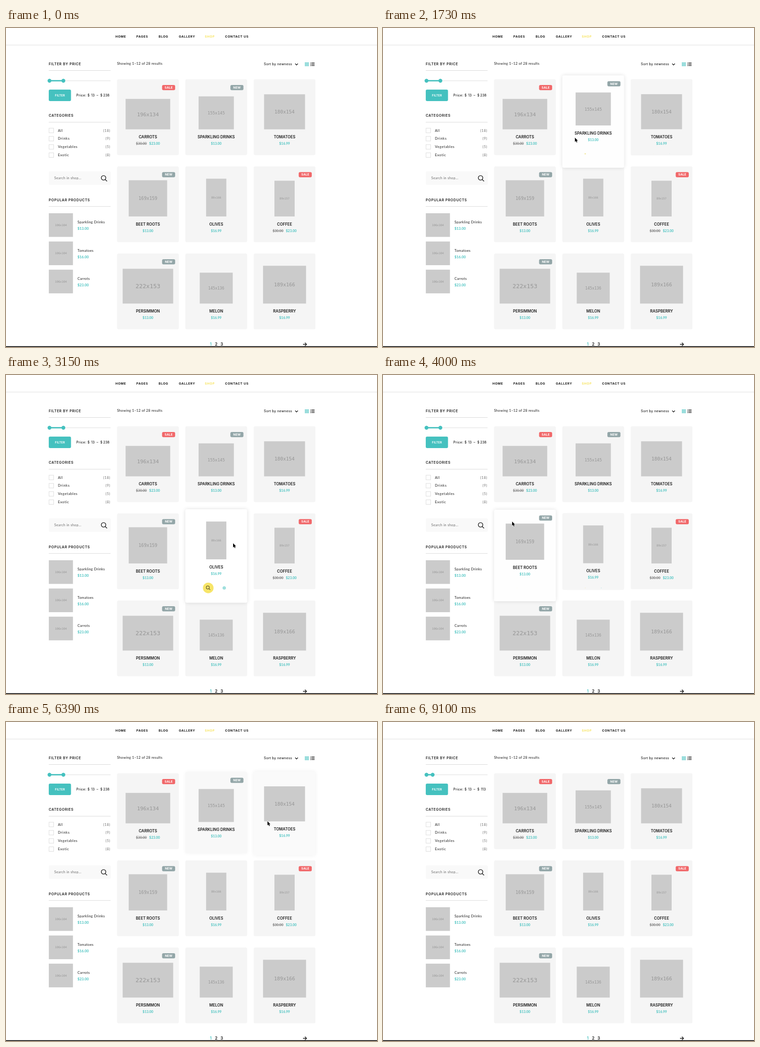
Animation of 807 by 694 pixels, one loop 9.82 s. Source, as an HTML page with a canvas:

```html
<!DOCTYPE html>
<html lang="en">
<head>
<meta charset="utf-8">
<title>Shop page</title>
<style>
html, body { margin: 0; width: 100%; height: 100%; overflow: hidden; background: #fff; }
canvas { display: block; width: 807px; height: 694px; }
</style>
</head>
<body>
<canvas id="stage"></canvas>
<script>
const W = 807, H = 694, LOOP = 9820, STEP = 95.4;
const TEAL = '#45c1bf', INK = '#1b1b1b', YELLOW = '#f7e463';
const SANS = 'Inter, "Open Sans", sans-serif';
const LATO = 'Lato, "Open Sans", sans-serif';
const MONO = '"DejaVu Sans Mono", "Liberation Mono", monospace';

const canvas = document.getElementById('stage');
const ctx = canvas.getContext('2d');
const dpr = window.devicePixelRatio || 1;
canvas.width = W * dpr;
canvas.height = H * dpr;

const CARD_W = 134.4, CARD_H = 165;
const cards = [
  ['CARROTS', '196x134', '$23.00', 'SALE', '$30.00'],
  ['SPARKLING DRINKS', '155x145', '$13.00', 'NEW'],
  ['TOMATOES', '180x154', '$16.99'],
  ['BEET ROOTS', '169x159', '$13.00', 'NEW'],
  ['OLIVES', '89x166', '$16.99'],
  ['COFFEE', '89x157', '$23.00', 'SALE', '$30.00'],
  ['PERSIMMON', '222x153', '$13.00', 'NEW'],
  ['MELON', '145x136', '$16.99'],
  ['RASPBERRY', '189x166', '$16.99']
].map(([name, size, price, badge, old], i) => ({
  name, size, price, badge, old, hovers: [],
  x: 241.5 + (i % 3) * 148.6,
  y: 111.5 + Math.floor(i / 3) * 189.5
}));

// Pointer tip: time, x, y
const pointer = [
  [100, 747, 306], [300, 640, 335], [500, 538, 265], [560, 519, 225], [585, 525, 216],
  [800, 540, 213], [1054, 621, 222], [1150, 617, 225], [1500, 538, 234], [1800, 375, 240],
  [2030, 306, 277], [2199, 302, 352], [2640, 376, 365], [2790, 390, 367], [3150, 494, 366],
  [3520, 494, 366], [3990, 241, 310], [4360, 99, 238], [4700, 99, 238], [5040, 99, 261],
  [5430, 99, 261], [5620, 98, 243], [6200, 524, 205], [6480, 648, 235], [7040, 127, 116],
  [7400, 135, 113], [7541, 172, 113], [7860, 173, 113], [8220, 107, 113], [8400, 120, 117],
  [8686, 804, 147]
];
const handle = [[7350, 124.8], [7541, 149.2], [7730, 173], [7860, 173], [8215, 108]];

const clamp = v => Math.max(0, Math.min(1, v));
const ease = v => 1 - Math.pow(1 - clamp(v), 2.5);

function sample(keys, t) {
  let i = 0;
  while (i < keys.length - 1 && keys[i + 1][0] <= t) i++;
  const a = keys[i], b = keys[Math.min(i + 1, keys.length - 1)];
  const k = b === a ? 0 : clamp((t - a[0]) / (b[0] - a[0]));
  return a.slice(1).map((v, j) => v + (b[j + 1] - v) * k);
}

function findHovers() {
  for (let t = 100; t < 9060; t += 5) {
    const [x, y] = sample(pointer, t);
    for (const c of cards) {
      if (x < c.x || x > c.x + CARD_W || y < c.y || y > c.y + CARD_H) continue;
      const last = c.hovers[c.hovers.length - 1];
      if (last && t - last.end <= 5) last.end = t;
      else c.hovers.push({ start: t, end: t });
    }
  }
}

function hoverState(card, t) {
  const h = card.hovers.filter(v => v.start <= t).pop();
  if (!h) return { lift: 0, icons: [0, 0] };
  const on = Math.min(t, h.end) - h.start;
  const left = 1 - ease((t - h.end) / 300);
  return {
    lift: ease(on / 300) * left,
    icons: [170, 300].map(d => clamp((on - d) / 200) * left)
  };
}

function text(str, x, y, font, color, spacing = 0, align = 'left') {
  ctx.font = font;
  ctx.fillStyle = color;
  ctx.letterSpacing = spacing + 'px';
  ctx.textAlign = align;
  ctx.fillText(str, x, y);
}

function box(x, y, w, h, r, color) {
  ctx.fillStyle = color;
  ctx.beginPath();
  ctx.roundRect(x, y, w, h, r);
  ctx.fill();
}

function disc(x, y, r, color) {
  ctx.fillStyle = color;
  ctx.beginPath();
  ctx.arc(x, y, r, 0, Math.PI * 2);
  ctx.fill();
}

function stroke(path, color, width) {
  ctx.strokeStyle = color;
  ctx.lineWidth = width;
  ctx.stroke(new Path2D(path));
}

function placeholder(label, cx, bottom) {
  const [w, h] = label.split('x').map(v => v / 2.02);
  box(cx - w / 2, bottom - h, w, h, 0, '#cbcbcb');
  const size = w * 0.49 / (label.length * 0.602);
  text(label, cx, bottom - h / 2 + size * 0.37, `${size}px ${MONO}`, '#969696', 0, 'center');
}

function magnifier(x, y, r, color, width) {
  const d = r * 0.7, e = r * 1.55;
  ctx.save();
  ctx.translate(x, y);
  stroke(`M${r} 0A${r} ${r} 0 1 1 ${-r} 0A${r} ${r} 0 1 1 ${r} 0M${d} ${d}L${e} ${e}`, color, width);
  ctx.restore();
}

function actionIcon(x, y, k, color, glyph) {
  if (k <= 0) return;
  ctx.save();
  ctx.translate(x, y);
  ctx.scale(k, k);
  ctx.globalAlpha = 0.4 + 0.6 * k;
  disc(0, 0, 12.3, color);
  glyph();
  ctx.restore();
}

function drawCard(c) {
  const { lift, icons } = c.state;
  const cx = c.x + CARD_W / 2, y = c.y - 9 * lift;
  const shade = Math.round(245 + 10 * lift);
  ctx.save();
  if (lift > 0) {
    ctx.shadowColor = `rgba(0,0,0,${0.13 * lift})`;
    ctx.shadowBlur = 9 * dpr;
  }
  box(c.x, y, CARD_W, CARD_H + 38.5 * lift, 3.5, `rgb(${shade},${shade},${shade})`);
  ctx.restore();

  placeholder(c.size, cx, y + 109);
  if (c.badge) {
    box(c.x + 98, y + 12.6, 28.4, 11.2, 3, c.badge === 'SALE' ? '#f1686a' : '#93a6a8');
    text(c.badge, c.x + 112.3, y + 20.4, `700 6.6px ${SANS}`, '#fff', 0.15, 'center');
  }
  text(c.name, cx, y + 128.7, `600 8.4px ${SANS}`, INK, 0, 'center');
  text(c.price, cx + (c.old ? 14.5 : 0), y + 142.7, `700 7.4px ${LATO}`, TEAL, 0, 'center');
  if (c.old) {
    text(c.old, cx - 14.3, y + 142.7, `7.4px ${LATO}`, '#666', 0, 'center');
    box(cx - 26, y + 139.8, 23.4, 0.8, 0, '#666');
  }
  actionIcon(cx - 17.4, c.y + 162.2, icons[0], YELLOW, () => magnifier(-1, -1, 3.6, '#5c5530', 1.3));
  actionIcon(cx + 17.4, c.y + 162.2, icons[1], TEAL, () =>
    stroke('M-4-2H4L3.3 5H-3.3ZM-2-2Q-2-5 0-5T2-2', '#fff', 1.2));
}

function drawHeader() {
  const nav = [['HOME', 238], ['PAGES', 283.5], ['BLOG', 332], ['GALLERY', 376],
    ['SHOP', 432.5], ['CONTACT US', 476.5]];
  for (const [label, x] of nav)
    text(label, x, 20.5, `700 6.8px ${SANS}`, label === 'SHOP' ? YELLOW : INK, 0.65);
  box(0, 36.5, W, 1.3, 0, '#e6e6e6');

  text('Showing 1–12 of 28 results', 241.5, 80.4, `7.6px ${LATO}`, INK, 0.28);
  text('Sort by newness', 561, 80.6, `500 7px ${SANS}`, INK, 0.38);
  stroke('M629 77.4L632 80.4 635 77.4', INK, 1.4);
  for (let i = 0; i < 9; i++)
    box(650.2 + (i % 3) * 3, 75 + Math.floor(i / 3) * 2.9, 2.2, 2.1, 0, TEAL);
  for (let i = 0; i < 3; i++) {
    box(662, 75.2 + i * 2.9, 1.4, 1.4, 0, INK);
    box(664.4, 75.2 + i * 2.9, 6.8, 1.3, 0, INK);
  }
}

function heading(label, y) {
  text(label, 93, y, `600 7.5px ${SANS}`, INK, 0.67);
  box(93, y + 11.2, 134.5, 1, 0, '#d9d9d9');
}

function drawFilter(t) {
  const [hx] = sample(handle, t);
  heading('FILTER BY PRICE', 80.8);
  box(93, 113.6, 134.5, 2.4, 1, '#f0f0f0');
  box(94, 113.3, hx - 94, 2.9, 0, TEAL);
  disc(94.6, 114.8, 4.2, TEAL);
  disc(hx, 114.8, 4.2, TEAL);

  box(93, 134, 48.4, 25, 3, TEAL);
  text('FILTER', 117.4, 148.6, `700 6px ${SANS}`, '#fff', 0.35, 'center');
  const font = `500 7.2px ${SANS}`;
  const top = Math.round(238 + (hx - 124.8) * 7.43);
  text('Price: $', 153, 148.6, font, INK, 0.35);
  text('13', 189, 148.6, font, INK, 0, 'center');
  text('–', 197, 148.6, font, INK);
  text('$', 205, 148.6, font, INK);
  text(top, 218.3, 148.6, font, INK, 0, 'center');
}

function drawCategories(t) {
  const rows = [['All', 18], ['Drinks', 9, 4655, 5610], ['Vegetables', 5, 5135, 5515], ['Exotic', 8]];
  heading('CATEGORIES', 193.2);
  rows.forEach(([label, count, from, to], i) => {
    const y = 223 + i * 17.85;
    ctx.strokeStyle = '#dcdcdc';
    ctx.lineWidth = 1;
    ctx.strokeRect(93.6, y - 5, 10, 10);
    if (t >= from && t < to)
      stroke(`M95.2 ${y + 0.3}L97.7 ${y + 2.8} 102.4 ${y - 2.4}`, INK, 1.3);
    text(label, 113, y + 2.6, `7.6px ${LATO}`, INK, 0.65);
    text(`(${count})`, 227, y + 2.6, `7.6px ${LATO}`, '#6d6d6d', 0.65, 'right');
  });
}

function drawSidebar(t) {
  drawFilter(t);
  drawCategories(t);
  box(93, 312, 135, 29.6, 3, '#f9f9f9');
  text('Search in shop...', 105, 329, `7.4px ${LATO}`, '#666', 0.4);
  magnifier(212.2, 326, 4.9, INK, 1.4);

  heading('POPULAR PRODUCTS', 376.6);
  [['Sparkling Drinks', '$13.00'], ['Tomatoes', '$16.00'], ['Carrots', '$23.00']].forEach(([name, price], i) => {
    const y = 403 + i * 61.4;
    placeholder('106x104', 119.4, y + 51.5);
    text(name, 155.5, y + 22.4, `7.6px ${LATO}`, INK, 0.35);
    text(price, 155.5, y + 36.4, `700 7.8px ${LATO}`, TEAL);
  });
}

function drawFooter() {
  ['1', '2', '3'].forEach((n, i) =>
    text(n, 445.4 + i * 11.9, 691.3, `600 8.8px ${SANS}`, i ? INK : TEAL, 0, 'center'));
  stroke('M646 688.2H653.5M650.2 684.6L653.8 688.2 650.2 691.8', INK, 1.4);
  box(0, 692.3, W, 1.7, 0, '#111');
}

function drawPointer(t) {
  if (t < 95 || t > 9060) return;
  const [x, y] = sample(pointer, t);
  const onName = cards.some(c => {
    const dy = y - (c.y + 125.5 - 9 * c.state.lift);
    return Math.abs(dy) < 6.5 && Math.abs(x - c.x - CARD_W / 2) < 25;
  });
  const onControl = (x < 110 && y > 215 && y < 285) || (x < 200 && y < 120);
  ctx.save();
  ctx.translate(x, y);
  ctx.lineJoin = 'round';
  if (onName || onControl) {
    const hand = 'M-1.3 .8Q0-.8 1.2 .8L1.5 4 5.8 5Q7.3 5.6 7 7.5L6 11.2H.4L-3.4 7Q-3.2 5.2-1 6.4Z';
    ctx.fillStyle = '#fff';
    ctx.fill(new Path2D(hand));
    stroke(hand + 'M2.4 7V9M4.3 7V9', '#111', 1.1);
  } else {
    const arrow = 'M0 0V9.2L2.1 7.3 3.6 10.6 5.1 10 3.7 6.8H6.4Z';
    stroke(arrow, '#fff', 1.4);
    ctx.fillStyle = '#000';
    ctx.fill(new Path2D(arrow));
  }
  ctx.restore();
}

function draw(now) {
  const t = 100 + Math.floor((now % LOOP - 96) / STEP) * STEP;
  ctx.setTransform(dpr, 0, 0, dpr, 0, 0);
  ctx.fillStyle = '#fff';
  ctx.fillRect(0, 0, W, H);
  drawHeader();
  drawSidebar(t);
  for (const c of cards) c.state = hoverState(c, t);
  [...cards].sort((a, b) => a.state.lift - b.state.lift).forEach(drawCard);
  drawFooter();
  drawPointer(t);
}

findHovers();
const begin = performance.now();
function tick() {
  draw(performance.now() - begin);
  requestAnimationFrame(tick);
}
tick();
</script>
</body>
</html>
```
